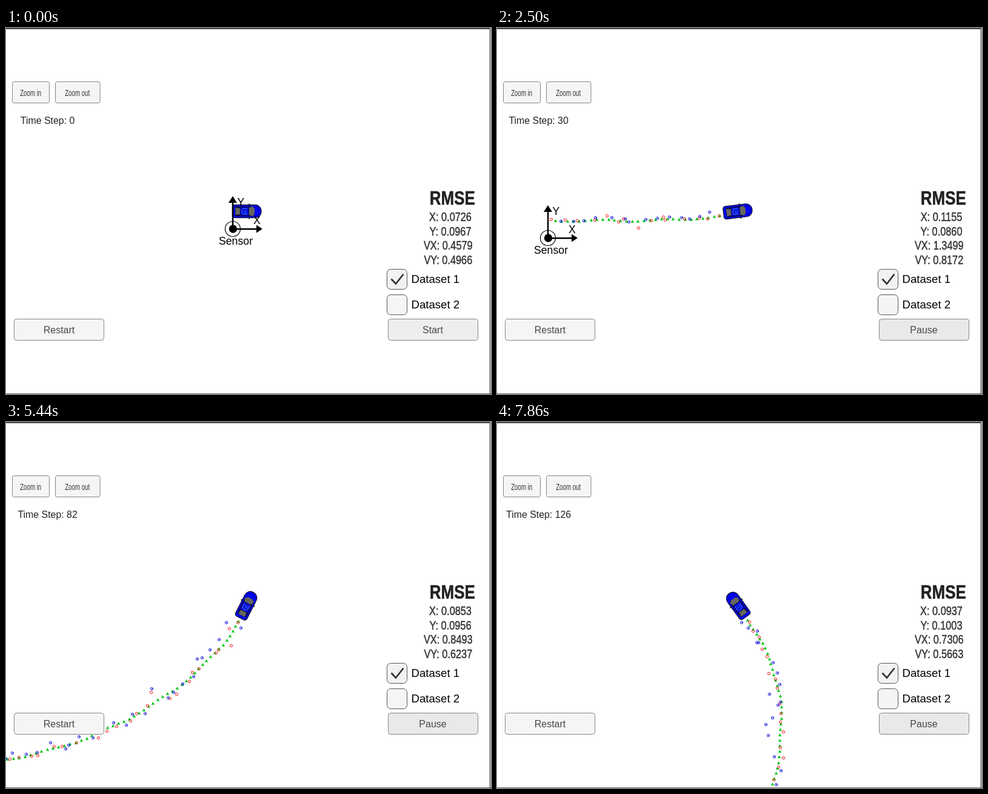
Recreate the animation shown at these times as an HTML page with a canvas. Size 800x603 px, loop 8000 ms.

```html
<!DOCTYPE html>
<html>
<head>
<meta charset="utf-8">
<style>
html, body { margin: 0; width: 100%; height: 100%; overflow: hidden; background: #fff }
canvas { display: block }
</style>
</head>
<body>
<canvas id="stage" width="800" height="603"></canvas>
<script>
const ctx = document.getElementById('stage').getContext('2d');
const LOOP = 8000, LAST = 126, CAR = [397, 302], SENSOR = [374, 331];
const FONT = '"Liberation Sans", Arial, sans-serif';

// step, x, y, heading in degrees, sideways error of the estimate
const path = [
  [0, 0, 0, 0, 0], [8, 78, 0, 0, -1], [30, 290, -15, 7, 5], [61, 564, -120, 35, 1],
  [82, 694, -264, 63, 1], [108, 734, -493, 97, 5], [LAST, 670, -641, 126, 0]
];
// step, then the errors of x, y, vx, vy
const errors = [
  [0, .0726, .0967, .4579, .4966], [8, .2045, .0846, 2.4924, 1.4195],
  [30, .1155, .0860, 1.3499, .8172], [61, .0887, .1058, .9718, .6524],
  [82, .0853, .0956, .8493, .6237], [108, .0922, .0998, .7754, .5997],
  [LAST, .0937, .1003, .7306, .5663]
];
// moments at which the view refreshes after the first smooth stretch
const ticks = [2500, 2680, 2940, 3200, 3480, 3660, 3940, 4220, 4480, 4760, 5020, 5440,
  5740, 6020, 6300, 6580, 6860, 7120, 7300, 7680, 7860];

function lerp(keys, v, col) {
  const { a, b, u } = span(keys, v);
  return a[col] + (b[col] - a[col]) * u;
}
function span(keys, v) {
  let i = 0;
  while (i < keys.length - 2 && v >= keys[i + 1][0]) i++;
  const a = keys[i], b = keys[i + 1];
  return { a, b, u: (v - a[0]) / (b[0] - a[0]) };
}
function direction(degrees) {
  const r = degrees * Math.PI / 180;
  return [Math.cos(r), -Math.sin(r)];
}
function carAt(step) {
  const { a, b, u } = span(path, step), n = b[0] - a[0];
  const da = direction(a[3]), db = direction(b[3]);
  const speed = k => 9.75 - .007 * k[0];
  const h = u * u * (3 - 2 * u);
  return [0, 1].map(i => a[i + 1] * (1 - h) + b[i + 1] * h
    + n * u * (1 - u) * ((1 - u) * speed(a) * da[i] - u * speed(b) * db[i]));
}
function estimateAt(step) {
  const [x, y] = carAt(step), [dx, dy] = direction(lerp(path, step, 3));
  const side = lerp(path, step, 4) + 1.5 * Math.sin(step * .6);
  return [CAR[0] + x - 11 * dx - side * dy, CAR[1] + y - 11 * dy + side * dx];
}
function stepAt(t) {
  if (t < ticks[0]) return Math.max(0, Math.floor((Math.min(t, 1560) - 850) / 57.7) - 1);
  const tick = ticks.filter(k => k <= t).pop();
  return Math.floor(30.2 + (tick - ticks[0]) / 55.8);
}

let seed = 11;
function random() {
  seed = seed * 16807 % 2147483647;
  return seed / 2147483647;
}
const noise = () => (random() + random() + random() - 1.5) * 2;

// lidar errs in x and y, radar in range and angle; they take turns
const estimates = [], lidar = [], radar = [];
for (let i = 0; i <= LAST; i++) {
  const [x, y] = estimateAt(i);
  estimates.push([x, y]);
  if (i % 2 == 0) {
    lidar.push([x + 4.5 * noise(), y + 4.5 * noise()]);
  } else {
    const dx = x - SENSOR[0], dy = y - SENSOR[1];
    const range = Math.hypot(dx, dy) + 5 * noise();
    const angle = Math.atan2(dy, dx) - .01 - .015 * noise();
    radar.push([SENSOR[0] + range * Math.cos(angle), SENSOR[1] + range * Math.sin(angle)]);
  }
}

function text(s, x, y, size, { color = '#222', align = 'center', squeeze = 1, weight = '', heavy = 0 } = {}) {
  ctx.save();
  ctx.translate(x, y);
  ctx.scale(squeeze, 1);
  ctx.font = `${weight} ${size}px ${FONT}`;
  ctx.textAlign = align;
  ctx.fillStyle = ctx.strokeStyle = color;
  ctx.fillText(s, 0, 0);
  if (heavy) {
    ctx.lineWidth = heavy;
    ctx.strokeText(s, 0, 0);
  }
  ctx.restore();
}
function box(x, y, w, h, r, fill, stroke = '#858585') {
  ctx.beginPath();
  ctx.roundRect(x + .5, y + .5, w, h, r);
  ctx.fillStyle = fill;
  ctx.fill();
  ctx.strokeStyle = stroke;
  ctx.lineWidth = 1;
  ctx.stroke();
}
function shape(points, fill, stroke) {
  ctx.beginPath();
  points.forEach(p => ctx.lineTo(...p));
  if (fill) { ctx.closePath(); ctx.fillStyle = fill; ctx.fill(); }
  if (stroke) { ctx.strokeStyle = stroke; ctx.stroke(); }
}
function ring(x, y, r, color, width = 1) {
  ctx.beginPath();
  ctx.arc(x, y, r, 0, 7);
  ctx.strokeStyle = color;
  ctx.lineWidth = width;
  ctx.stroke();
}

function drawTrail(step, ox, oy) {
  const place = (points, count, mark) => points.slice(0, count).forEach(([x, y]) =>
    mark(Math.round(x - ox) + .5, Math.round(y - oy) + .5));
  place(estimates, step + 1, (x, y) =>
    shape([[x, y - 2.5], [x + 2.7, y + 2.2], [x - 2.7, y + 2.2]], '#00c814'));
  place(lidar, Math.floor(step / 2) + 1, (x, y) => ring(x, y, 2.1, '#f01010'));
  place(radar, Math.floor(step / 2), (x, y) => {
    ring(x, y, 2.1, '#1010d8');
    ctx.fillStyle = '#1010d8';
    ctx.fillRect(x - .5, y - .5, 2, 1);
  });
}

function drawCar(degrees) {
  ctx.save();
  ctx.translate(...CAR);
  ctx.rotate(-degrees * Math.PI / 180);
  ctx.fillStyle = '#111';
  ctx.fillRect(3, -12.5, 2, 25);
  ctx.beginPath();
  ctx.roundRect(-23.5, -10.5, 47.5, 21, [4, 10, 10, 4]);
  ctx.fillStyle = '#0505f5';
  ctx.fill();
  ctx.strokeStyle = '#101040';
  ctx.lineWidth = 1.3;
  ctx.stroke();
  shape([[-19, -8], [8, -8.5], [13, -6], [13, 6], [8, 8.5], [-19, 8]], '#0a0a50');
  shape([[-18.5, -6], [-11, -5], [-11, 5], [-18.5, 6]], '#66665f');
  shape([[4, -6], [10, -8], [13, -4], [13, 4], [10, 8], [4, 6]], '#66665f');
  ctx.fillStyle = '#0707d8';
  ctx.fillRect(-10, -6.5, 13, 13);
  ctx.lineWidth = 1;
  shape([[1, -4.5], [-6, -4.5], [-8, -2], [-8, 2], [-6, 4.5], [1, 4.5]], null, '#3f83ff');
  shape([[1, -1], [-4, -1], [-4, 2], [1, 2]], null, '#2b62e8');
  shape([[15, -8], [20, -4], [20, 4], [15, 8]], null, '#0000a8');
  ctx.restore();
}

function drawSensor(x, y) {
  const label = { color: '#000' };
  ctx.save();
  ctx.translate(x, y);
  ctx.fillStyle = '#000';
  ctx.fillRect(-1.2, -46, 2.5, 46);
  ctx.fillRect(0, -1, 42, 2.5);
  shape([[0, -54], [7, -43], [-7, -43]], '#000');
  shape([[49, 0], [39, -6.5], [39, 6.5]], '#000');
  ring(0, 0, 12.5, '#000', 1.2);
  ctx.beginPath();
  ctx.arc(.5, 0, 6.7, 0, 7);
  ctx.fill();
  text('Y', 13.5, -38, 17.7, label);
  text('X', 40, -8, 17.7, label);
  text('Sensor', 5, 26, 17.7, label);
  ctx.restore();
}

function drawPanel(t, step) {
  const label = { color: '#484848' }, narrow = { color: '#333', squeeze: .67 };
  box(10, 88, 61, 35, 3, '#f5f5f5');
  box(81, 88, 73.5, 35, 3, '#f5f5f5');
  text('Zoom in', 40.7, 112, 14.5, narrow);
  text('Zoom out', 117.7, 112, 14.5, narrow);
  text('Time Step: ' + step, 68.6, 158, 15.9);

  box(13, 479, 148, 35, 4, '#f5f5f5');
  text('Restart', 87.5, 503, 16, label);
  box(630, 479, 148, 35, 4, t < 680 ? '#eeeeee' : t < 720 ? '#ececec' : '#e9e9e9');
  text(t < 860 ? 'Start' : 'Pause', 704, 503, 16, label);

  text('RMSE', 736.3, 291, 32, { squeeze: .81, weight: 'bold', heavy: .6 });
  ['X', 'Y', 'VX', 'VY'].forEach((name, i) =>
    text(`${name}: ${lerp(errors, step, i + 1).toFixed(4)}`, i < 2 ? 733 : 729.3,
      318 + 23.7 * i, 21, { squeeze: .777, color: '#333', heavy: .5 }));

  box(628, 397, 33, 33, 6, '#f2f2f2', '#555');
  box(628, 439, 33, 33, 6, '#f5f5f5', '#555');
  ctx.lineWidth = 2.7;
  shape([[635.5, 413.5], [643, 421.5], [655.5, 405.5]], null, '#333');
  const side = { align: 'left', color: '#000' };
  text('Dataset 1', 668.5, 420, 18.6, side);
  text('Dataset 2', 668.5, 461.5, 18.6, side);

  ctx.fillStyle = '#a09e98';
  ctx.fillRect(797, 0, 3, 603);
  ctx.fillStyle = '#444';
  ctx.fillRect(0, 0, 798, 2);
  ctx.fillStyle = '#666';
  ctx.fillRect(0, 602, 800, 1);
}

function draw(now) {
  const t = now % LOOP, step = stepAt(t);
  const [ox, oy] = carAt(step).map(Math.round);
  ctx.fillStyle = '#fff';
  ctx.fillRect(0, 0, 800, 603);
  drawTrail(step, ox, oy);
  drawCar(lerp(path, step, 3));
  drawSensor(SENSOR[0] - ox, SENSOR[1] - oy);
  drawPanel(t, step);
  requestAnimationFrame(draw);
}
requestAnimationFrame(draw);
</script>
</body>
</html>
```
